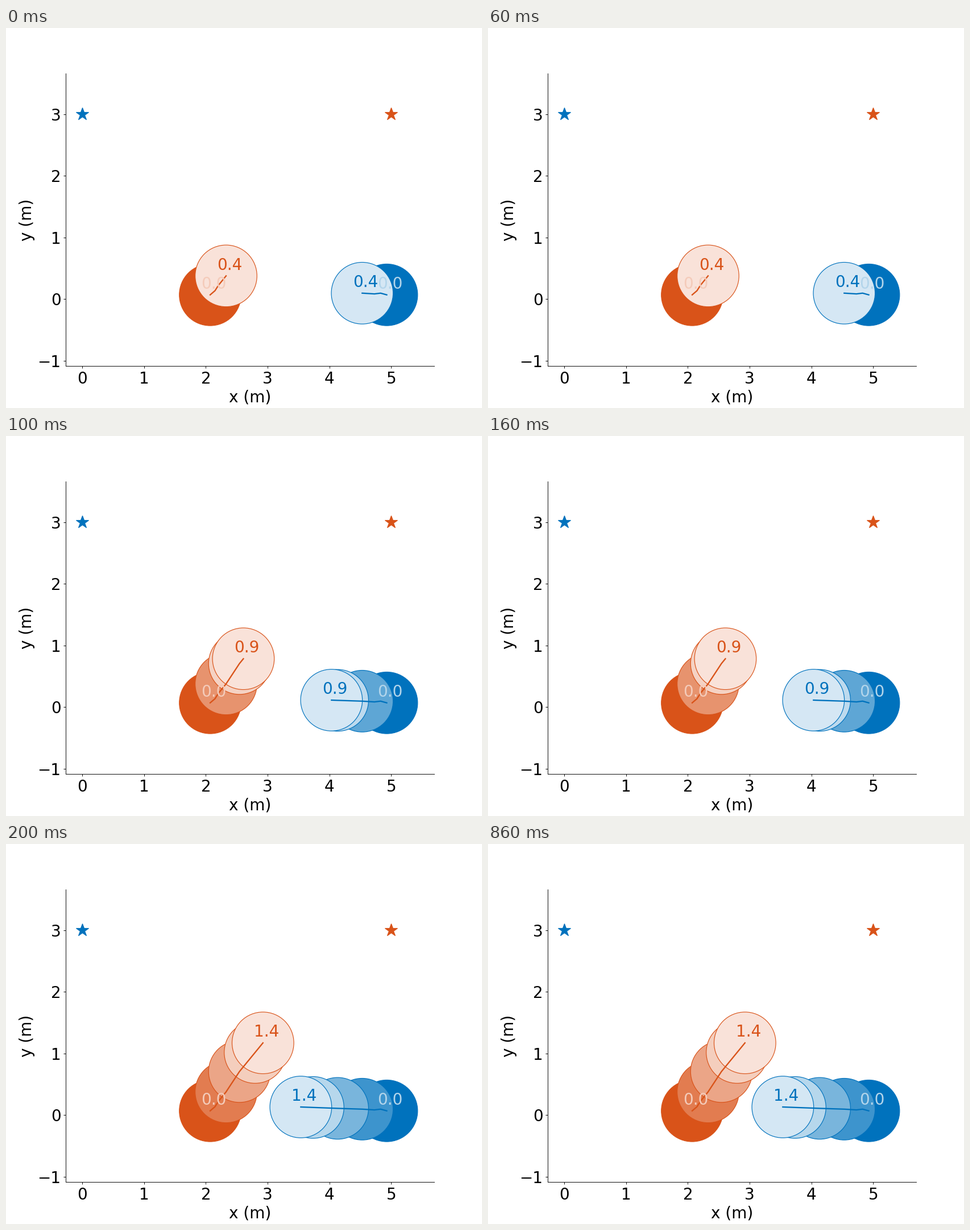
A matplotlib script that plays this animation: 837x669 px, repeating every 1300 ms.

```python
import numpy as np
import matplotlib.pyplot as plt
from matplotlib.animation import FuncAnimation

W, H, DPI = 837, 669, 83.7
FONT = 24
RADIUS = 0.5
DT = 0.1
STEPS = np.arange(15)
ORANGE = np.array([0.85, 0.325, 0.098])
BLUE = np.array([0.0, 0.447, 0.741])

plt.rcParams["font.family"] = "DejaVu Sans"

# Both agents begin with one diagonal step of 0.1 m
START = 0.1 * np.sqrt(0.5)
TURNS = [0, 1, 2, 4, 8, 14]


def bend(*values):
    """Move steadily between the values reached at each turn."""
    return np.interp(STEPS, TURNS, values)


orange_path = np.column_stack([
    bend(2 + START, 2.149, 2.204, 2.328, 2.545, 2.925),
    bend(START, 0.138, 0.225, 0.378, 0.708, 1.172),
])
blue_path = np.column_stack([
    5 - START - 0.0994 * STEPS,
    bend(START, 0.098, 0.086, 0.098, 0.111, 0.133),
])
AGENTS = [
    (orange_path, (5, 3), ORANGE),
    (blue_path, (0, 3), BLUE),
]

# The small excess keeps the pixel size from rounding down
fig = plt.figure(figsize=((W + 0.01) / DPI, (H + 0.01) / DPI), dpi=DPI,
                 facecolor="white")
ax = fig.add_axes([0.125, 0.11, 0.775, 0.77])

# Equal scale on both axes, fitted to the width with a 5% margin
right = 5 - START + RADIUS
margin = 0.05 * right
span_x = right + 2 * margin
span_y = span_x * (0.77 * H) / (0.775 * W)
mid_y = (3 + START - RADIUS) / 2
ax.set_xlim(-margin, right + margin)
ax.set_ylim(mid_y - span_y / 2, mid_y + span_y / 2)
ax.set_xticks(range(6))
ax.set_yticks(range(-1, 4))
ax.tick_params(labelsize=FONT)
ax.set_xlabel("x (m)", fontsize=FONT)
ax.set_ylabel("y (m)", fontsize=FONT)
ax.spines[["top", "right"]].set_visible(False)

for _, goal, color in AGENTS:
    ax.plot(*goal, marker="*", markersize=20, color=color)

moving = []


def tint(color, alpha):
    """Blend a colour with white."""
    return 1 - alpha * (1 - color)


def add_label(pos, step, color):
    moving.append(ax.text(pos[0] - 0.15, pos[1] + 0.1, f"{step * DT:.1f}",
                          color=color, fontsize=FONT))


def draw_agent(path, color, last):
    moving.extend(ax.plot(*path[:last + 1].T, color=color, linewidth=2))
    for step in [*range(0, last, 4), last]:
        fill = tint(color, 1 - step / (1.2 * last))
        disc = plt.Circle(path[step], RADIUS, fc=fill, ec=color, lw=1)
        moving.append(ax.add_patch(disc))
    add_label(path[0], 0, tint(color, 0.3))
    add_label(path[last], last, color)


def update(frame):
    while moving:
        moving.pop().remove()
    last = 4 + 5 * min(frame, 2)
    for path, _, color in AGENTS:
        draw_agent(path, color, last)
    return moving


anim = FuncAnimation(fig, update, frames=13, interval=100,
                     init_func=lambda: [], repeat=True, repeat_delay=0)
plt.show()
```
